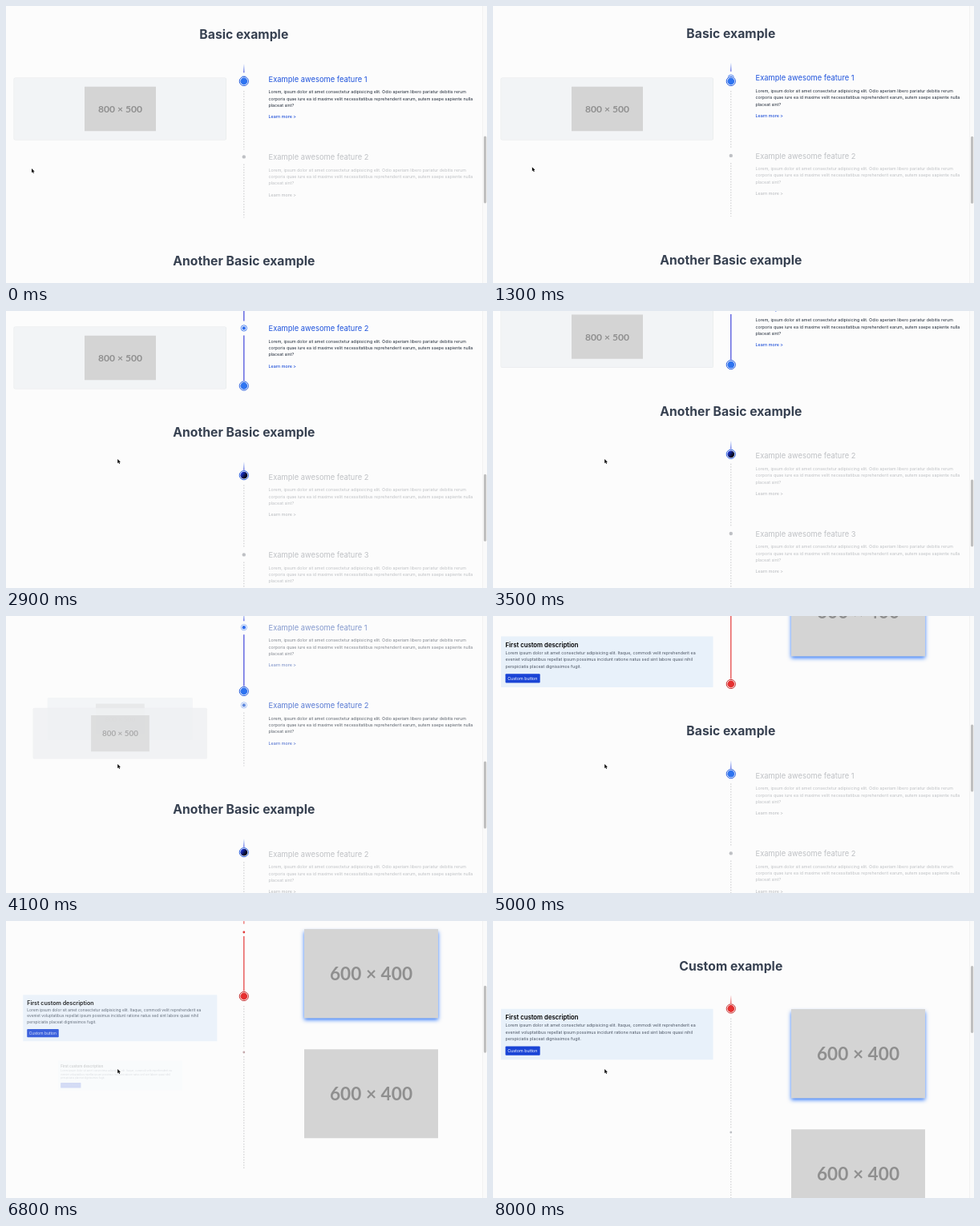
These frames come from a looping animation (600 by 346 pixels, 8100 ms). An HTML page with a canvas:

```html
<!DOCTYPE html>
<html lang="en">
<head>
<meta charset="utf-8">
<title>Scroll timeline</title>
<style>
html, body { margin: 0; width: 100%; height: 100%; overflow: hidden; background: #fcfcfc; }
canvas { display: block; width: 600px; height: 346px; }
</style>
</head>
<body>
<canvas id="stage"></canvas>
<script>
const W = 600, H = 346, LOOP = 8100, STEP = 100, FADE = 300;
const STICKY_DOT = 94, STICKY_CARD = 89.5, ENTER_AT = 125, AXIS = 296.8;
const PAGE = '#fcfcfc', MUTED = [190, 192, 196];

const canvas = document.getElementById('stage');
const dpr = window.devicePixelRatio || 1;
canvas.width = W * dpr;
canvas.height = H * dpr;
const ctx = canvas.getContext('2d');

// [time, scroll offset]
const SCROLL = [[0, 0], [1200, 0], [1400, 3], [1700, 13], [2000, 31], [2300, 75], [2600, 130],
  [2900, 167], [3200, 188], [3700, 197], [3800, 197], [3900, 163], [4000, 117], [4100, 77],
  [4300, 8], [4500, -45], [4700, -80], [5000, -108], [5100, -108], [5600, -178], [5700, -178],
  [5800, -199], [6100, -209], [6400, -209], [6500, -211], [6600, -211], [6666, -259],
  [6800, -329], [6900, -360], [7100, -388], [7300, -388], [7600, -410], [8000, -429]];
// [time, x, y] of the pointer tip
const POINTER = [[0, 32, 203], [500, 39.5, 202.5], [1400, 50, 201], [2000, 58, 199.5],
  [2400, 64, 198], [2800, 139.2, 185]];

const FEATURE_TEXT = [
  'Lorem, ipsum dolor sit amet consectetur adipisicing elit. Odio aperiam libero pariatur debitis rerum',
  'corporis quae iure ea id maxime velit necessitatibus reprehenderit earum, autem saepe sapiente nulla',
  'placeat sint?'];
const CARD_TEXT = [
  'Lorem ipsum dolor sit amet consectetur adipisicing elit. Itaque, commodi velit reprehenderit ea',
  'eveniet voluptatibus repellat ipsum possimus incidunt ratione natus sed sint labore quasi nihil',
  'perspiciatis placeat dignissimos fugit.'];

const BLUE = { line: '#5054dd', rgb: [47, 110, 238], ring: '#2a5fdf', fill: '#2f74f0' };
const basicSection = (title, shift, firstNumber, theme) => ({
  title, theme, firstNumber, titleY: 41.2 + shift, top: 89.2 + shift, bottom: 264.5 + shift,
  nodes: [91.2 + shift, 188.4 + shift], gap: 9, nodeRadius: 2.2, cardHeight: 78,
  drawCard: drawImageCard, drawItem: drawFeature
});
const sections = [
  {
    title: 'Custom example', titleY: -366.8, top: -319.5, bottom: -19, nodes: [-315, -165],
    gap: 5, nodeRadius: 1.4, cardHeight: 63.5, drawCard: drawTextCard, drawItem: drawPicture,
    theme: { line: '#e54848', rgb: [226, 59, 59], ring: '#c53030', fill: '#e53030' }
  },
  basicSection('Basic example', 0, 1, BLUE),
  basicSection('Another Basic example', 283, 2, { ...BLUE, fill: null })
];

const clamp = (v, lo, hi) => Math.max(lo, Math.min(hi, v));
const rgb = c => `rgb(${c.map(Math.round).join()})`;
const mix = (a, b, w) => rgb(a.map((v, i) => v + (b[i] - v) * w));

function track(keys, t, column = 1) {
  const next = keys.findIndex(k => k[0] > t);
  if (next < 0) return keys[keys.length - 1][column];
  const a = keys[next - 1], b = keys[next];
  return a[column] + (b[column] - a[column]) * (t - a[0]) / (b[0] - a[0]);
}

// Index of the last item the scroll has reached, -1 before the first.
const activeItem = (section, scroll) =>
  section.nodes.filter((y, i) => y - scroll < (i ? STICKY_DOT : ENTER_AT)).length - 1;

for (const section of sections) {
  let current = activeItem(section, 0);
  section.changes = [{ time: -FADE, from: current, to: current }];
  for (let time = 0; time < LOOP; time += 2) {
    const to = activeItem(section, track(SCROLL, time));
    if (to !== current) section.changes.push({ time, from: current, to });
    current = to;
  }
}

// Text is laid out at ten times its size so that advances stay fractional.
function text(str, x, y, size, color, { weight = 400, family = 'Inter', align = 'left' } = {}) {
  ctx.save();
  ctx.translate(x, y);
  ctx.scale(0.1, 0.1);
  ctx.font = `${weight} ${size * 10}px ${family}, sans-serif`;
  ctx.textAlign = align;
  ctx.fillStyle = color;
  ctx.fillText(str, 0, 0);
  ctx.restore();
}

function paragraph(lines, x, y, color) {
  lines.forEach((line, i) => text(line, x, y + i * 8.4, 5.32, color));
}

function box(x, y, w, h, color, radius = 0) {
  ctx.fillStyle = color;
  ctx.beginPath();
  ctx.roundRect(x, y, w, h, radius);
  ctx.fill();
}

function disc(y, radius, color) {
  ctx.fillStyle = color;
  ctx.beginPath();
  ctx.arc(AXIS, y, radius, 0, 7);
  ctx.fill();
}

function ring(y, radius, width, color) {
  ctx.strokeStyle = color;
  ctx.lineWidth = width;
  ctx.beginPath();
  ctx.arc(AXIS, y, radius, 0, 7);
  ctx.stroke();
}

function axisLine(from, to, color, width, dash = []) {
  if (to <= from) return;
  ctx.strokeStyle = color;
  ctx.lineWidth = width;
  ctx.setLineDash(dash);
  ctx.beginPath();
  ctx.moveTo(AXIS, from);
  ctx.lineTo(AXIS, to);
  ctx.stroke();
  ctx.setLineDash([]);
}

function placeholder(label, x, y, w, h, size) {
  box(x, y, w, h, '#d4d4d4');
  text(label, x + w / 2, y + h / 2 + size * 0.375, size, '#8f8f8f',
    { weight: 700, family: 'Lato', align: 'center' });
}

// Cards are drawn with their top at y = 0.
function drawImageCard() {
  box(9.5, 0, 265.5, 78, '#e7eaec', 2);
  box(10.1, 0.6, 264.3, 76.8, '#f2f4f6', 1.6);
  placeholder('800 × 500', 98, 11.3, 89, 55.4, 12.1);
}

function drawTextCard() {
  box(10, 0, 264.5, 63.5, '#e8f1fa');
  text('First custom description', 15.5, 13.6, 7.77, '#000', { weight: 600 });
  paragraph(CARD_TEXT, 15.5, 22.3, '#4b5563');
  box(15.5, 46.8, 43.2, 11.2, '#1a44d6', 1);
  text('Custom button', 18.2, 54.2, 5.35, '#fff');
}

function drawFeature(section, i, y, weight) {
  const x = 327.5;
  text(`Example awesome feature ${section.firstNumber + i}`, x, y + 3.6, 9.36, mix(MUTED, [29, 82, 220], weight));
  paragraph(FEATURE_TEXT, x, y + 18.1, mix(MUTED, [31, 41, 55], weight));
  text('Learn more >', x, y + 49.1, 5.4, mix(MUTED, [29, 78, 216], weight), { weight: 500 });
}

function drawPicture(section, i, y, weight, active) {
  const top = y - 3.7;
  if (active) {
    ctx.save();
    ctx.shadowColor = '#2f78fa';
    ctx.shadowBlur = 5 * dpr;
    ctx.shadowOffsetY = 3 * dpr;
    box(372, top, 167, 111, '#d4d4d4');
    ctx.restore();
  }
  placeholder('600 × 400', 372, top, 167, 111, 22.7);
}

function drawAxis(section, scroll, weights) {
  const { theme, nodes, gap } = section;
  const top = section.top - scroll, bottom = section.bottom - scroll;
  const dot = clamp(STICKY_DOT, top, bottom - 4);

  const lead = ctx.createLinearGradient(0, top - 17, 0, top - 6);
  lead.addColorStop(0, `rgba(${theme.rgb}, 0)`);
  lead.addColorStop(1, theme.line);
  axisLine(top - 17, top - 6, lead, 1.2);

  nodes.forEach((node, i) => {
    const y = node - scroll;
    const start = y + gap;
    const end = i + 1 < nodes.length ? nodes[i + 1] - scroll - gap : bottom;
    axisLine(start, Math.min(end, dot - 6), theme.line, 1.3);
    axisLine(Math.max(start, dot + 12), end, '#cbccce', 1.1, [1.5, 1.8]);
    disc(y, section.nodeRadius, mix(MUTED, theme.rgb, y < dot ? 1 : weights[i]));
    if (gap > 5) ring(y, 3.7, 0.8, `rgba(${theme.rgb}, ${0.3 * (y < dot) + 0.7 * weights[i]})`);
  });

  let fill = theme.fill;
  if (!fill) {
    fill = ctx.createLinearGradient(AXIS - 4, dot - 3, AXIS + 4, dot + 3);
    fill.addColorStop(0, '#1f3df0');
    fill.addColorStop(0.75, '#03051c');
  }
  disc(dot, 6.4, PAGE);
  ring(dot, 5.6, 1, theme.ring);
  disc(dot, 4.4, fill);
}

function drawCard(section, y, scale, alpha) {
  if (alpha <= 0) return;
  const half = section.cardHeight / 2;
  ctx.save();
  ctx.globalAlpha = alpha;
  ctx.translate(142.3, y + half);
  ctx.scale(scale, scale);
  ctx.translate(-142.3, -half);
  section.drawCard();
  ctx.restore();
}

function drawSection(section, t, scroll) {
  const change = section.changes.filter(c => c.time <= t).pop();
  const p = 1 - (1 - clamp((t - change.time) / FADE, 0, 1)) ** 3;
  const weights = section.nodes.map((_, i) => (i === change.to ? p : 0) + (i === change.from ? 1 - p : 0));

  text(section.title, AXIS, section.titleY - scroll, 15.75, '#374151', { weight: 700, align: 'center' });
  section.nodes.forEach((node, i) =>
    section.drawItem(section, i, node - scroll, weights[i], i === change.to));
  drawAxis(section, scroll, weights);

  const cardY = Math.min(Math.max(STICKY_CARD, section.top - scroll + 0.3),
    section.bottom - scroll - section.cardHeight);
  const away = Math.sign(change.from - change.to) * 98 * p ** 1.67;
  if (change.to >= 0) drawCard(section, cardY, 0.5 + p / 2, p);
  if (change.from >= 0) drawCard(section, cardY + away, 1 - p / 2, 1 - p);
}

function drawScrollbar(scroll) {
  box(594, 0, 6, H, '#fafafa');
  box(594, 0, 0.6, H, '#ececec');
  box(596, 162.4 + scroll * 0.2483, 3.2, 84, '#bfbfbf', 1.6);
}

function drawPointer(x, y) {
  const shape = new Path2D('M0 0V5.2L1.2 4.1L2 6L2.9 5.6L2.1 3.8H3.7Z');
  ctx.save();
  ctx.translate(x, y);
  ctx.strokeStyle = '#fff';
  ctx.lineWidth = 0.8;
  ctx.stroke(shape);
  ctx.fillStyle = '#000';
  ctx.fill(shape);
  ctx.restore();
}

function frame() {
  const t = Math.floor(performance.now() % LOOP / STEP) * STEP;
  const scroll = track(SCROLL, t);
  ctx.setTransform(dpr, 0, 0, dpr, 0, 0);
  box(0, 0, W, H, PAGE);
  sections.forEach(section => drawSection(section, t, scroll));
  drawScrollbar(scroll);
  drawPointer(track(POINTER, t, 1), track(POINTER, t, 2));
  requestAnimationFrame(frame);
}
frame();
</script>
</body>
</html>
```
